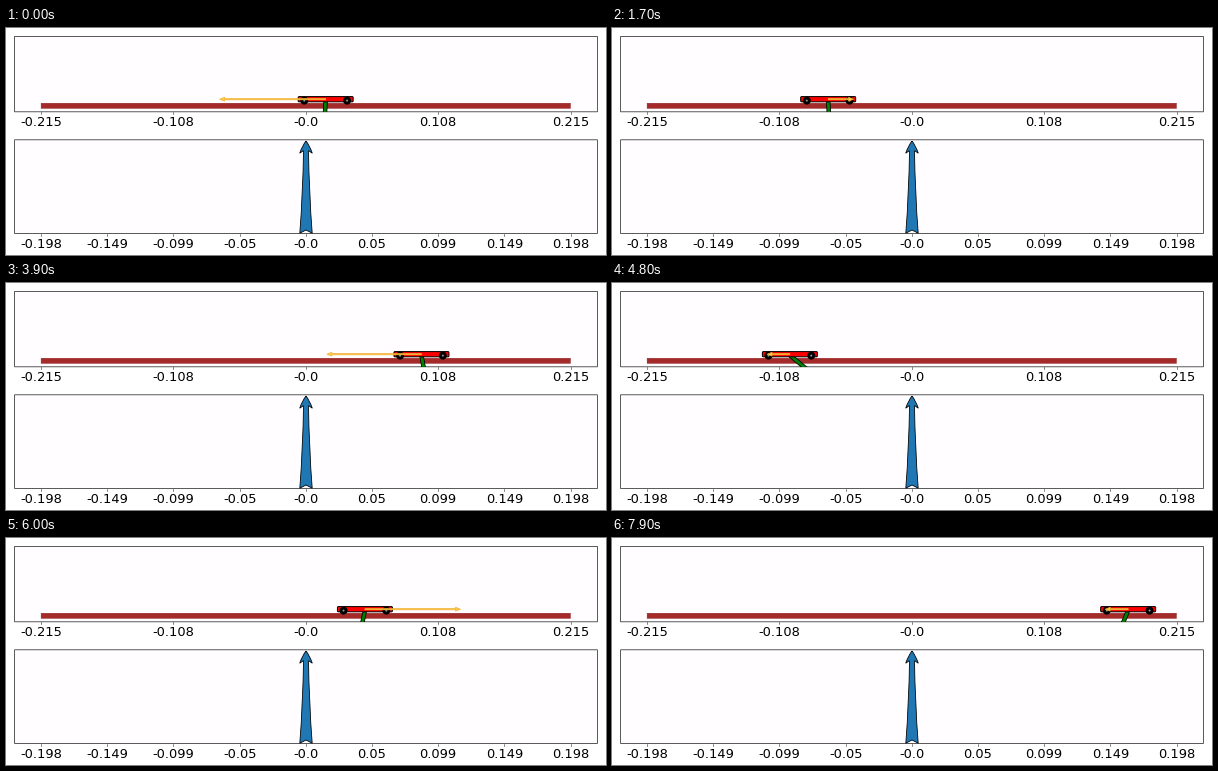
These frames come from a looping animation (600 px wide and 227 px high, 8000 ms). A matplotlib script:

```python
import numpy as np
import matplotlib.pyplot as plt
from matplotlib.animation import FuncAnimation
from matplotlib.patches import Circle, FancyBboxPatch, PathPatch, Polygon, Rectangle
from matplotlib.path import Path

W, H, DPI = 600, 227, 100
PX = 72 / DPI
STEP, FRAMES = 100, 80
CENTER, HALF = 299.8, 264.7
CART_Y, WHEEL_X = 71.2, 21.4

# Turning points (seconds, value): cart centre in px, control arrow in px, pole lean in degrees
CART = [(-0.57, 230), (0.4, 371), (1.58, 212), (3.2, 522), (5.15, 149),
        (6.76, 535), (8.2, 514)]
FORCE = [(0, -106), (0.9, -106), (2.2, 88), (4, -96), (5.9, 98), (7, -23)]
LEAN = [(0, -3), (0.6, 15), (1.2, -8), (1.7, 3), (2.9, -26), (5, 52),
        (6.4, -26), (7.9, -22)]


def swing(turns, t):
    """Ease along a half cosine from each turning point to the next."""
    ts, vs = zip(*turns)
    pos = np.interp(t, ts, range(len(ts)))
    i = min(int(pos), len(ts) - 2)
    return vs[i] + (vs[i + 1] - vs[i]) * (1 - np.cos(np.pi * (pos - i))) / 2


fig = plt.figure(figsize=(W / DPI, H / DPI), dpi=DPI, facecolor="white")
ax = fig.add_axes([0, 0, 1, 1])
ax.set_xlim(0, W)
ax.set_ylim(H, 0)
ax.axis("off")


def panel(top, bottom, limit, parts):
    """Framed box with evenly spaced ticks over the track."""
    frame = Rectangle((8.6, top), 582.8, bottom - top, fc="#fffdff", ec="#333333",
                      lw=0.8 * PX, snap=False, zorder=0)
    ax.add_patch(frame)
    for f in np.linspace(-1, 1, parts):
        x = CENTER + f * HALF
        value = round(f * limit, 3)
        label = "-0.0" if value == 0 else str(value)
        ax.plot([x, x], [bottom, bottom + 2.2], color="#333333", lw=0.6 * PX)
        ax.text(x, bottom + 14.7, label, size=13 * PX, family="DejaVu Sans",
                ha="center", va="baseline")
    return frame


def pointer():
    """Upright arrow with a curved head and a notched, flared tail."""
    right = np.array([(300, 113), (303.6, 117.5), (306.3, 125.2), (302.5, 122.6),
                      (303, 165), (306.2, 205.2), (300, 202)])
    left = right[-2::-1] * (-1, 1) + (600, 0)
    M, L, Q = Path.MOVETO, Path.LINETO, Path.CURVE3
    return Path(np.vstack([right, left]), [M, Q, Q, L, Q, Q, L, L, Q, Q, L, Q, Q])


frame = panel(8.4, 83.8, 0.215, 5)
panel(111.8, 205.5, 0.198, 9)
ax.add_patch(Rectangle((CENTER - HALF, 75.2), 2 * HALF, 5.2, fc="#a52a2a",
                       ec="#8f2424", lw=0.4 * PX, snap=False, zorder=1))
ax.add_patch(PathPatch(pointer(), fc="#1f77b4", ec="black", lw=0.8 * PX, zorder=3))

pole = ax.add_patch(Polygon(np.zeros((4, 2)), fc="green", ec="black",
                            lw=0.8 * PX, zorder=2))
pole.set_clip_path(frame)
body = ax.add_patch(FancyBboxPatch((0, 0), 55, 5.2, fc="red", ec="black",
                                   boxstyle="round,pad=0,rounding_size=1",
                                   lw=1 * PX, snap=False, zorder=4))
wheels = [(dx, ax.add_patch(Circle((0, 0), r, fc=c, ec="none", zorder=z)))
          for dx in (-WHEEL_X, WHEEL_X)
          for r, c, z in ((4, "black", 5), (1, "#999999", 6))]
arrow = ax.add_patch(Polygon(np.zeros((7, 2)), fc="#ffd040", ec="#f2ac34",
                             lw=0.7 * PX, zorder=7))


def pole_points(x, lean):
    a = np.radians(lean)
    along = np.array([np.sin(a), np.cos(a)]) * 40
    side = np.array([np.cos(a), -np.sin(a)]) * 1.8
    base = np.array([x, CART_Y + 1])
    return [base - side, base + side, base + along + side, base + along - side]


def arrow_points(x, length):
    tip = x + length
    neck = tip - np.sign(length) * min(5, abs(length))
    upper = [(x, -0.6), (neck, -0.6), (neck, -1.9), (tip, 0)]
    lower = [(px, -py) for px, py in upper[2::-1]]
    return np.array(upper + lower) + (0, CART_Y)


def update(i):
    t = i * STEP / 1000
    x = swing(CART, t)
    body.set_x(x - body.get_width() / 2)
    body.set_y(CART_Y - body.get_height() / 2)
    for dx, wheel in wheels:
        wheel.center = (x + dx, CART_Y + 1.4)
    pole.set_xy(pole_points(x, swing(LEAN, t)))
    arrow.set_xy(arrow_points(x, swing(FORCE, t)))
    return [body, pole, arrow] + [w for _, w in wheels]


anim = FuncAnimation(fig, update, frames=FRAMES, interval=STEP, repeat=True,
                     repeat_delay=0, blit=False)
plt.show()
```
